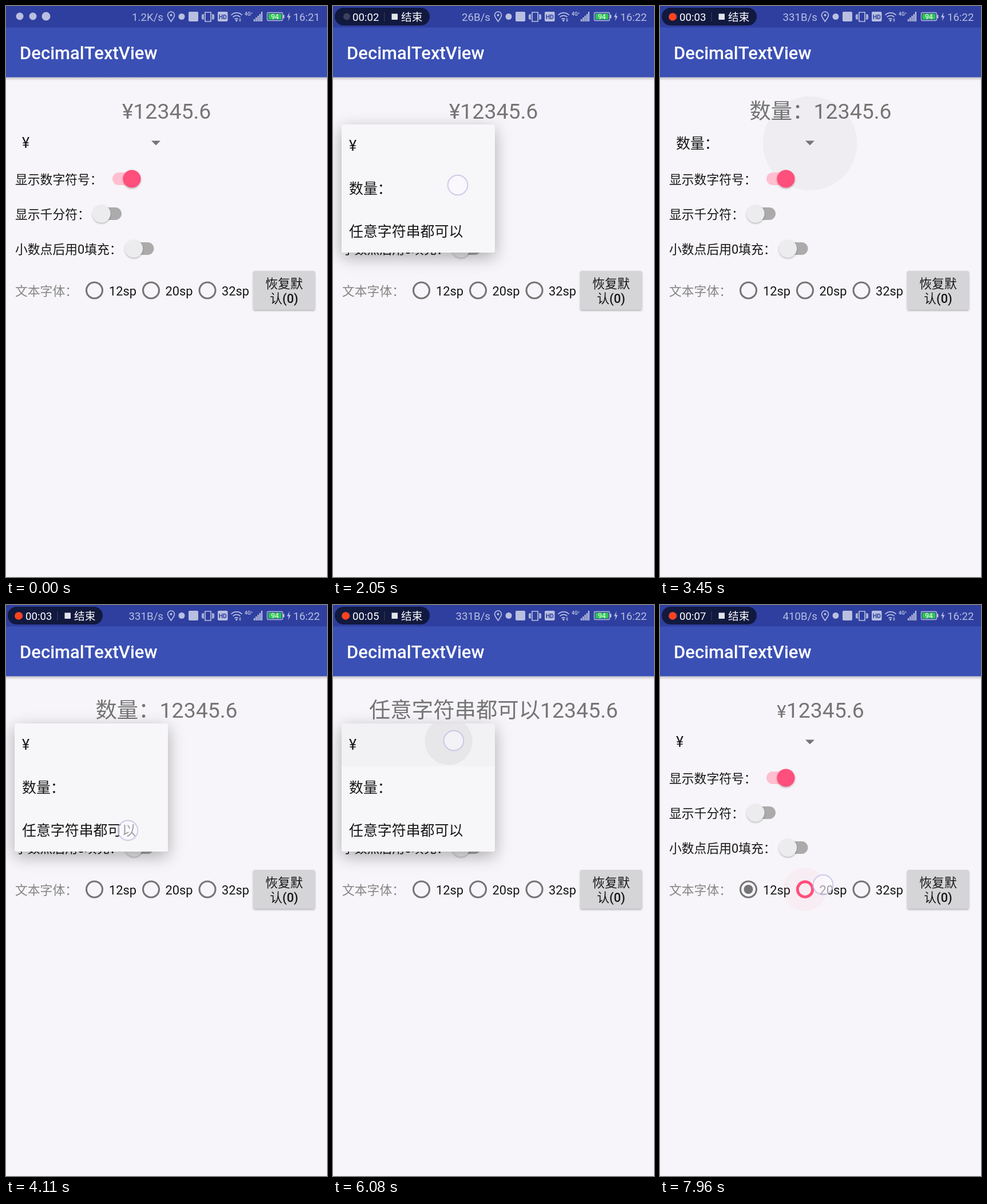
These frames come from a looping animation (561 px wide and 998 px high, 8 s). An HTML page:

```html
<!DOCTYPE html>
<html lang="zh-CN">
<head>
<meta charset="utf-8">
<title>DecimalTextView</title>
<style>
html, body { margin: 0; height: 100%; overflow: hidden; background: #f7f5f9; }
svg { display: block; width: 100vw; height: 100vh; font-family: Roboto, "Noto Sans CJK SC", "Noto Sans CJK", sans-serif; }
.status { font-size: 18.7px; fill: #b9bfe0; }
.label { font-size: 21.8px; fill: #161616; }
.item { font-size: 24.93px; fill: #161616; }
.headline { font-size: 37.4px; fill: #757575; text-anchor: middle; }
.line { fill: none; stroke: #b9bfe0; stroke-width: 1.7; }
.radio { fill: none; stroke: #757575; stroke-width: 3.1; }

/* Every animation shares one 8 s clock: 1% = 80 ms */
.step { animation: var(--k) 8s step-end infinite; }
.ease { animation: var(--k) 8s linear infinite; }
.scale { transform-box: fill-box; transform-origin: center; }

@keyframes start { 0% { opacity: 1 } 3%, to { opacity: 0 } }
@keyframes minute { 0% { opacity: 0 } 3%, to { opacity: 1 } }
@keyframes speed2 { 0%, 38.5%, to { opacity: 0 } 3% { opacity: 1 } }
@keyframes speed3 { 0%, 90.5%, to { opacity: 0 } 38.5% { opacity: 1 } }
@keyframes speed4 { 0% { opacity: 0 } 90.5%, to { opacity: 1 } }
@keyframes recording { 0% { opacity: 0 } 38.5%, to { opacity: 1 } }
@keyframes pill { 0%, .5% { opacity: 0 } 4.9%, to { opacity: 1 } }
@keyframes seconds {
  0% { transform: none } 12.5% { transform: translateY(-30px) }
  25.5% { transform: translateY(-60px) } 38.5% { transform: translateY(-90px) }
  51.5% { transform: translateY(-120px) } 64.5% { transform: translateY(-150px) }
  77.5% { transform: translateY(-180px) } 90.5%, to { transform: translateY(-210px) }
}

@keyframes yen { 0%, 79%, to { opacity: 1 } 32.25% { opacity: 0 } }
@keyframes yenBig { 0%, 79% { opacity: 1 } 32.25%, 87.6%, to { opacity: 0 } }
@keyframes quantity { 0%, 55.5%, to { opacity: 0 } 32.25% { opacity: 1 } }
@keyframes anyText { 0%, 79%, to { opacity: 0 } 55.5% { opacity: 1 } }
@keyframes yen12 { 0%, 99.25%, to { opacity: 0 } 87.6% { opacity: 1 } }
@keyframes yen20 { 0% { opacity: 0 } 99.25%, to { opacity: 1 } }

@keyframes popup {
  0%, 13.5%, 34.4%, 44%, 57.6%, 66.6%, 81.1%, to { opacity: 0 }
  16.25%, 32.25%, 46.5%, 55.5%, 69.25%, 79% { opacity: 1 }
}
@keyframes spinnerRipple {
  0%, 10.4%, 18%, 41.5%, 49%, 64.4%, 72%, to { opacity: 0; transform: scale(.1) }
  10.6%, 41.7%, 64.6% { opacity: .035; transform: scale(.2) }
  14%, 45%, 68% { opacity: .035; transform: scale(1) }
  17.9%, 48.9%, 71.9% { opacity: 0; transform: scale(1) }
}
@keyframes row {
  0% { transform: translateY(75px) } 40% { transform: translateY(150px) }
  60%, to { transform: none }
}
@keyframes rowTint {
  0%, 26%, 35%, 51.5%, 58%, 74.8%, 82%, to { opacity: 0 }
  27.2%, 34.4%, 52.7%, 57.6%, 76%, 81.5% { opacity: .02 }
}
@keyframes rowRipple {
  0%, 26.2%, 35%, 51.7%, 58%, 75%, 82%, to { opacity: 0; transform: translateX(62px) scale(.18) }
  26.3%, 51.8%, 75.1% { opacity: .05; transform: translateX(62px) scale(.18) }
  32.5%, 34.9%, 57.9%, 81.4% { opacity: .05; transform: none }
}

@keyframes ring1 { 0%, 99.25%, to { stroke: #757575 } 87.6% { stroke: #ff4f7b } }
@keyframes dot1 { 0%, 87.6% { transform: scale(0) } 90%, to { transform: scale(1) } }
@keyframes dotTint { 0%, 87.6% { fill: #ff4f7b } 99.25%, to { fill: #757575 } }
@keyframes ring2 { 0% { stroke: #757575; stroke-width: 3.1px; r: 14px } 99.25%, to { stroke: #ff4f7b; stroke-width: 5px; r: 13.2px } }
@keyframes radioRipple1 {
  0%, 86.2% { opacity: 0; transform: scale(.2) } 88.5% { opacity: .1; transform: scale(1) }
  92%, to { opacity: 0; transform: scale(1) }
}
@keyframes radioRipple2 { 0%, 98.6% { opacity: 0; transform: scale(.4) } 99.5%, to { opacity: .04; transform: scale(1) } }

@keyframes touch {
  0%, 12%, 29.5%, 43.1%, 53.8%, 66%, 77.3%, 87.6% { opacity: 0; transform: none }
  10.4%, 41.5%, 64.4% { opacity: 1; transform: translate(230px, 242px) }
  25% { opacity: 1; transform: translate(218px, 313px) }
  50.8% { opacity: 1; transform: translate(213px, 394px) }
  74.5% { opacity: 1; transform: translate(211px, 237px) }
  86% { opacity: 1; transform: translate(175px, 490px) }
  98.5%, to { opacity: 1; transform: translate(285px, 489px) }
}
</style>
</head>
<body>
<svg viewBox="0 0 561 998">
  <defs>
    <linearGradient id="barShadow" x2="0" y2="1">
      <stop stop-color="#000" stop-opacity=".2"/><stop offset="1" stop-color="#000" stop-opacity="0"/>
    </linearGradient>
    <filter id="soft" x="-30%" y="-30%" width="160%" height="160%">
      <feDropShadow dx="0" dy="1.5" stdDeviation="1.5" flood-opacity=".3"/>
    </filter>
    <filter id="blur" x="-30%" y="-30%" width="160%" height="160%">
      <feGaussianBlur stdDeviation="14"/>
    </filter>
    <clipPath id="rowClip"><rect x="15" y="207" width="268" height="74.7"/></clipPath>
    <clipPath id="digitClip"><rect x="60" y="5" width="25" height="28"/></clipPath>
    <g id="switchOff">
      <rect x="-7" y="-11" width="42" height="22" rx="11" fill="#ababab"/>
      <circle r="15.6" fill="#ececee" filter="url(#soft)"/>
    </g>
  </defs>

  <rect width="561" height="998" fill="#f7f5f9"/>
  <rect y="124.6" width="561" height="6" fill="url(#barShadow)"/>
  <rect y="37" width="561" height="87.6" fill="#3b50b5"/>
  <rect width="561" height="37.4" fill="#2e3f9f"/>
  <text x="24" y="93" font-size="31" font-weight="500" fill="#fff">DecimalTextView</text>

  <!-- Status bar -->
  <g class="status">
    <circle cx="24" cy="18" r="6.5"/>
    <g class="step" style="--k:start"><circle cx="47" cy="18" r="6.5"/><circle cx="70" cy="18" r="7.5"/></g>
    <g text-anchor="end">
      <text class="step" style="--k:start" x="275" y="26">1.2K/s</text>
      <text class="step" style="--k:speed2" x="275" y="26">26B/s</text>
      <text class="step" style="--k:speed3" x="275" y="26">331B/s</text>
      <text class="step" style="--k:speed4" x="275" y="26">410B/s</text>
    </g>
    <path class="line" d="M288.5 27C284 21 282.5 19 282.5 16a6 6 0 0 1 12 0c0 3-1.5 5-6 11z"/>
    <circle cx="288.5" cy="16" r="2"/>
    <circle cx="307" cy="18.5" r="5.5"/>
    <rect x="319" y="10" width="17" height="17" rx="2"/>
    <path class="line" d="M348 11h10v16h-10zM345 14v10M361 14v10M342.5 15l1 2-1 2 1 2-1 2M363.5 15l-1 2 1 2-1 2 1 2"/>
    <rect x="370" y="10" width="17.5" height="17" rx="2"/>
    <text x="378.8" y="22.5" font-size="10.5" font-weight="700" text-anchor="middle" style="fill:#2e3f9f">HD</text>
    <path class="line" d="M393.5 16a13 13 0 0 1 19 0M396.5 19.5a9 9 0 0 1 13 0M399.5 23a5 5 0 0 1 6 0"/>
    <circle cx="402.8" cy="25.5" r="1.7"/>
    <path d="M407 24l2-2.5 2 2.5zM407 25l2 2.5 2-2.5z"/>
    <text x="417" y="17" font-size="8.5" font-weight="700">4G⁺</text>
    <path class="line" style="stroke-width:2.3" d="M434 27v-4M437.3 27v-7M440.6 27v-10M443.9 27v-13M447 27v-17"/>
    <rect class="line" x="456.5" y="11.5" width="27" height="14" rx="2" style="stroke-width:1.3"/>
    <rect x="484" y="15.5" width="2.5" height="6"/>
    <rect x="458.5" y="13.5" width="23" height="10" fill="#2fc653"/>
    <text x="470" y="23" font-size="12" text-anchor="middle" style="fill:#fff">94</text>
    <path d="M495.5 11l-4.5 8.5h3l-1 7 4.5-9h-3z"/>
    <text class="step" style="--k:start" x="502" y="26">16:21</text>
    <text class="step" style="--k:minute" x="502" y="26">16:22</text>
  </g>

  <!-- Recorder pill -->
  <g class="ease" style="--k:pill" font-size="18.7" fill="#fff">
    <rect x="3" y="3" width="166" height="31" rx="15.5" fill="#11193f"/>
    <circle cx="24" cy="18.5" r="6" fill="#3b415e"/>
    <circle class="step" style="--k:recording" cx="22" cy="19" r="6.8" fill="#fb4320"/>
    <text x="34" y="26">00:0</text>
    <g clip-path="url(#digitClip)">
      <g class="step" style="--k:seconds">
        <text y="26"><tspan x="70">0</tspan><tspan x="70" dy="30">1</tspan><tspan x="70" dy="30">2</tspan><tspan x="70" dy="30">3</tspan><tspan x="70" dy="30">4</tspan><tspan x="70" dy="30">5</tspan><tspan x="70" dy="30">6</tspan><tspan x="70" dy="30">7</tspan></text>
      </g>
    </g>
    <path d="M90 11v16" stroke="#3a4262"/>
    <rect x="102.5" y="13.5" width="10.5" height="10.5" fill="#e3e4ea"/>
    <text x="119" y="26">结束</text>
  </g>

  <!-- Amount -->
  <g class="headline">
    <text class="step" style="--k:yenBig" x="280.5" y="196.5">¥12345.6</text>
    <text class="step" style="--k:quantity" x="280.5" y="196.5">数量：12345.6</text>
    <text class="step" style="--k:anyText" x="280.5" y="196.5">任意字符串都可以12345.6</text>
    <text class="step" style="--k:yen12" x="280.5" y="196.5"><tspan font-size="18.7">¥</tspan>12345.6</text>
    <text class="step" style="--k:yen20" x="280.5" y="196.5"><tspan font-size="31.2">¥</tspan>12345.6</text>
  </g>

  <!-- Spinner -->
  <circle class="ease scale" style="--k:spinnerRipple" cx="262" cy="240" r="150"/>
  <g class="item">
    <text class="step" style="--k:yen" x="28" y="248">¥</text>
    <text class="step" style="--k:quantity" x="28" y="249">数量：</text>
    <text class="step" style="--k:anyText" x="28" y="249">任意字符串都可以</text>
  </g>
  <path d="M254 235.5h16l-8 8z" fill="#757575"/>

  <!-- Switches -->
  <g class="label">
    <text x="16" y="311">显示数字符号：</text>
    <text x="16" y="372">显示千分符：</text>
    <text x="16" y="433">小数点后用0填充：</text>
  </g>
  <rect x="186" y="291" width="42" height="22" rx="11" fill="#ffbfd0"/>
  <circle cx="220" cy="302" r="15.6" fill="#ff4f7b" filter="url(#soft)"/>
  <use href="#switchOff" x="167" y="363"/>
  <use href="#switchOff" x="223.5" y="424"/>

  <!-- Font size -->
  <g class="label">
    <text x="16" y="505.5" style="fill:#858585">文本字体：</text>
    <text x="180" y="505.5">12sp</text>
    <text x="278.5" y="505.5">20sp</text>
    <text x="377" y="505.5">32sp</text>
  </g>
  <circle class="ease scale" style="--k:radioRipple1" cx="154.5" cy="497" r="38" fill="#ff4f7b"/>
  <circle class="ease scale" style="--k:radioRipple2" cx="253.5" cy="497" r="38" fill="#ff4f7b"/>
  <circle class="radio step" style="--k:ring1" cx="154.5" cy="497" r="14"/>
  <g class="step" style="--k:dotTint"><circle class="ease scale" style="--k:dot1" cx="154.5" cy="497" r="8"/></g>
  <circle class="radio step" style="--k:ring2" cx="253.5" cy="497" r="14"/>
  <circle class="radio" cx="352" cy="497" r="14"/>
  <rect x="432" y="463" width="108" height="68" rx="3" fill="#d5d4d7" filter="url(#soft)"/>
  <g class="label" font-weight="500" text-anchor="middle">
    <text x="486" y="493">恢复默</text>
    <text x="486" y="518.5">认(0)</text>
  </g>

  <!-- Dropdown: the shadow fades faster than the sheet -->
  <g class="ease" style="--k:popup">
    <g class="ease" style="--k:popup">
      <rect x="15" y="215" width="268" height="224" rx="3" fill-opacity=".3" filter="url(#blur)"/>
    </g>
  </g>
  <g class="ease" style="--k:popup">
    <rect x="15" y="207" width="268" height="224" rx="3" fill="#f7f6f9"/>
    <g class="step" style="--k:row">
      <g clip-path="url(#rowClip)">
        <rect class="ease" style="--k:rowTint" x="15" y="207" width="268" height="75"/>
        <circle class="ease scale" style="--k:rowRipple" cx="149" cy="238" r="139"/>
      </g>
    </g>
    <g class="item">
      <text x="28" y="253">¥</text>
      <text x="28" y="328">数量：</text>
      <text x="28" y="403">任意字符串都可以</text>
    </g>
  </g>

  <g class="step" style="--k:touch">
    <circle r="17.3" fill="#fcfbff" fill-opacity=".6" stroke="#c6c2e6" stroke-opacity=".85" stroke-width="2"/>
  </g>
</svg>
</body>
</html>
```
